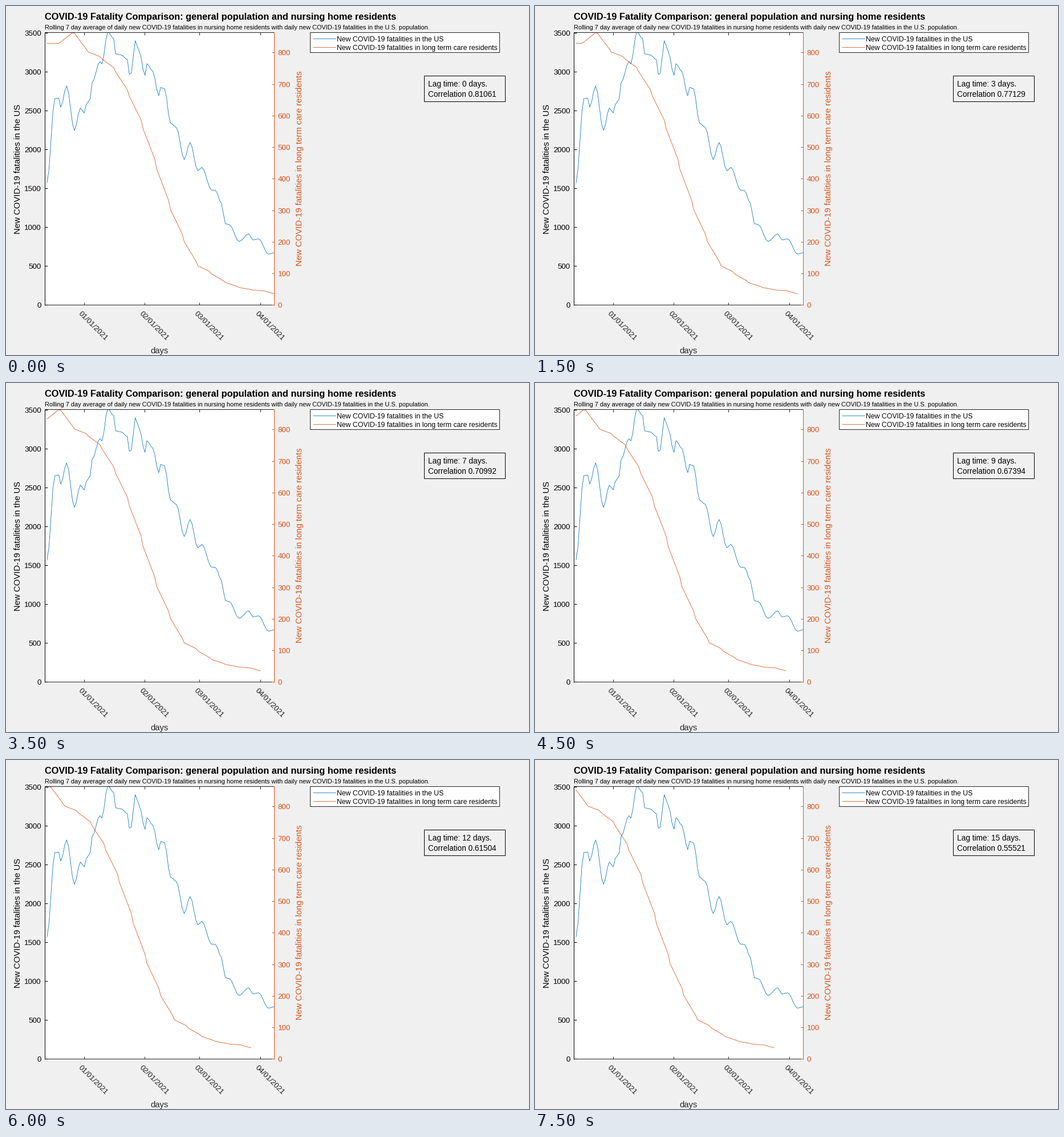
Write a matplotlib script that moves like this. It is 917 px wide and 611 px high and loops after 8 s.

```python
import numpy as np
import matplotlib.pyplot as plt
from matplotlib.animation import FuncAnimation
from matplotlib.patches import Rectangle

W, H, DPI = 917, 611, 100
PX = 72 / DPI
LEFT, RIGHT, TOP, BOTTOM = 68, 470, 46, 523.5
DAYS, LAGS = 117, 16
US_MAX, CARE_MAX = 3509, 864.2
BLUE, ORANGE, DARK = "#0072BD", "#D95319", "#262626"
US_LABEL = "New COVID-19 fatalities in the US"
CARE_LABEL = "New COVID-19 fatalities in long term care residents"

day = np.arange(1, DAYS + 1)


def eased(x, keys):
    """Smoothstep between (position, value) turning points."""
    kx, ky = np.transpose(keys)
    i = np.clip(np.searchsorted(kx, x, side="right") - 1, 0, len(kx) - 2)
    t = (x - kx[i]) / (kx[i + 1] - kx[i])
    return ky[i] + (ky[i + 1] - ky[i]) * t * t * (3 - 2 * t)


def weekly(x, totals):
    """Weekly values; each new week opens with a step along the local trend."""
    ends = 7 * np.arange(len(totals))
    opens = totals + np.gradient(totals) / 4
    knots = np.column_stack([ends, ends + 1]).ravel()
    return np.interp(x, knots, np.column_stack([totals, opens]).ravel())


us = eased(day, [
    (1, 1575), (5, 2660), (7, 2665), (8, 2550), (11, 2823), (15, 2250), (18, 2538),
    (20, 2475), (21, 2580), (23, 2655), (24, 2865), (28, 3135), (29, 3105),
    (32, 3520), (35, 3430), (36, 3235), (39, 3220), (42, 3160), (43, 2972),
    (44, 2988), (46, 3405), (48, 3270), (51, 2960), (52, 3108), (55, 3010),
    (58, 2697), (59, 2803), (61, 2785), (64, 2345), (67, 2288), (71, 1875),
    (74, 2095), (78, 1730), (80, 1775), (85, 1482), (87, 1478), (90, 1310),
    (92, 1050), (94, 1038), (99, 822), (104, 920), (106, 842), (109, 855),
    (114, 658), (117, 677),
])
care = weekly(day, np.array([830, 830, 864, 812, 788, 753, 683, 587, 463, 333,
                             226, 140, 107, 78, 60, 50, 45.5, 33]))

# smooth correlation curve through a few lags
key_lags = np.array([0, 2, 5, 7, 10, 13, 15])
key_corr = [0.81061, 0.7853, 0.74199, 0.70992, 0.65468, 0.59523, 0.55521]
correlation = np.polyval(np.polyfit(key_lags, key_corr, 6), np.arange(LAGS))


def day_x(d):
    return LEFT + (RIGHT - LEFT) * np.asarray(d) / DAYS


def val_y(v, top):
    return BOTTOM - (BOTTOM - TOP) * np.asarray(v) / top


plt.rcParams["font.family"] = "Liberation Sans"
fig = plt.figure(figsize=(W / DPI, H / DPI), dpi=DPI, facecolor="#F0F0F0")
ax = fig.add_axes([0, 0, 1, 1])
ax.set_xlim(0, W)
ax.set_ylim(H, 0)
ax.axis("off")


def text(x, y, s, size, color="black", ha="left", **kw):
    return ax.text(x, y, s, fontsize=size * PX, color=color, ha=ha,
                   va="baseline", rotation_mode="anchor", **kw)


def rule(x0, y0, x1, y1, color=DARK, width=1):
    ax.plot([x0, x1], [y0, y1], color=color, lw=width * PX, zorder=3,
            solid_capstyle="butt")


def box(x0, y0, x1, y1, fill, edge):
    patch = Rectangle((x0, y0), x1 - x0, y1 - y0, facecolor=fill,
                      edgecolor=edge, lw=PX, joinstyle="miter")
    return ax.add_patch(patch)


def curve(color):
    line, = ax.plot([], [], color=color, lw=0.8 * PX, zorder=2)
    line.set_clip_path(Rectangle((LEFT, TOP), RIGHT - LEFT + 1, BOTTOM - TOP,
                                 transform=ax.transData))
    return line


def set_curve(line, d, v, top):
    # half a pixel puts the line on pixel centres
    line.set_data(day_x(d) + 0.5, val_y(v, top) + 0.5)


# plot area
floor = int(BOTTOM)
box(LEFT, TOP, RIGHT, floor, "white", "none")
us_line, care_line = curve(BLUE), curve(ORANGE)
set_curve(us_line, day, us, US_MAX)
rule(LEFT, TOP, RIGHT, TOP)
rule(LEFT, floor, RIGHT, floor)
rule(LEFT, TOP, LEFT, floor + 1, "black")
rule(RIGHT, TOP, RIGHT, floor + 1, ORANGE)

# ticks
for v in range(0, 3501, 500):
    y = val_y(v, US_MAX)
    rule(LEFT, min(y, floor), LEFT + 5, min(y, floor), "black")
    text(62, y + 5, str(v), 13.4, ha="right")
for v in range(0, 801, 100):
    y = val_y(v, CARE_MAX)
    rule(RIGHT - 4, min(y, floor), RIGHT, min(y, floor), ORANGE)
    text(476.5, y + 5, str(v), 13.4, ORANGE)
for month, d in enumerate([20, 51, 79, 110], 1):
    x = day_x(d)
    rule(x, floor - 4, x, floor)
    rule(x, TOP, x, TOP + 5)
    text(x + 13.7, 563, f"{month:02d}/01/2021", 13.4, DARK, "center", rotation=-45)

# titles and axis labels
text(68, 24, "COVID-19 Fatality Comparison: general population and nursing home residents",
     16.35, weight="bold")
text(68, 41, "Rolling 7 day average of daily new COVID-19 fatalities in nursing home "
     "residents with daily new COVID-19 fatalities in the U.S. population.", 11.04)
text(25, 285, US_LABEL, 14.95, ha="center", rotation=90)
text(519, 284, CARE_LABEL, 14.95, ORANGE, "center", rotation=90)
text(269.5, 608, "days", 14.7, DARK, "center")

# legend
box(533, 46, 865, 81, "white", DARK)
for y, color, label in [(57, BLUE, US_LABEL), (72, ORANGE, CARE_LABEL)]:
    rule(538, y, 578, y, color, 0.8)
    text(580.5, y + 4.5, label, 12.22)

# lag readout
readout = box(733, 122, 875, 167, "none", "black")
lag_text = text(740, 141, "", 13.65)
corr_text = text(740, 159, "", 13.65)


def update(lag):
    set_curve(care_line, day[:DAYS - lag], care[lag:], CARE_MAX)
    number = f"{correlation[lag]:.5g}"
    lag_text.set_text(f"Lag time: {lag} days.")
    corr_text.set_text(f"Correlation {number}")
    readout.set_width(142 - 7.5 * (7 - len(number)))
    return care_line, lag_text, corr_text, readout


anim = FuncAnimation(fig, update, frames=LAGS, interval=500,
                     repeat=True, repeat_delay=0, blit=False)
plt.show()
```
